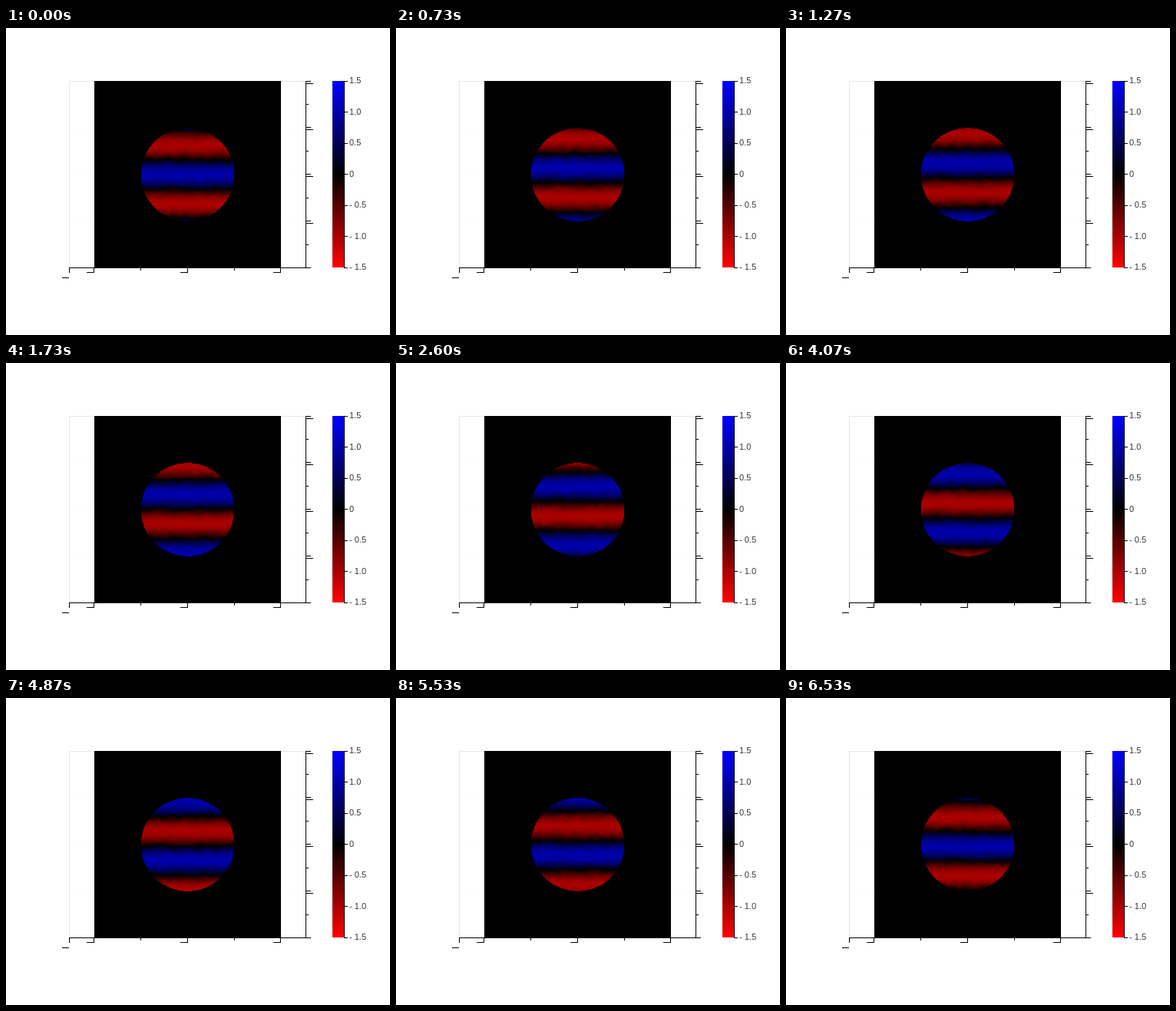
Animation, 500 px wide and 400 px high, one loop 6670 ms. Source, as an HTML page with a canvas:

```html
<!DOCTYPE html>
<html>
<head>
<meta charset="utf-8">
<style>
html, body { margin: 0; width: 100%; height: 100%; overflow: hidden; background: #fff; }
canvas { display: block; }
</style>
</head>
<body>
<canvas id="stage" width="500" height="400"></canvas>
<script>
const ctx = document.getElementById('stage').getContext('2d');
const LOOP = 6670, SLOTS = 100;
const LEFT = 176, TOP = 130, WIDTH = 121, HEIGHT = 122, RADIUS = 60.75;
const WAVE = 5 / RADIUS;      // radians per pixel
const PEAK = 170;             // amplitude 1 on a scale of 1.5
const held = new Set([1, 3, 12, 18, 27, 38, 40, 45, 54, 60, 69, 75, 78, 87, 99]);

function rect(x, y, w, h, color = '#000') {
  ctx.fillStyle = color;
  ctx.fillRect(x, y, w, h);
}

function drawPlot() {
  rect(0, 0, 500, 400, '#fff');
  for (const y of [130, 191, 252]) rect(82, y, 309, 1, '#fcfcfc');
  rect(82, 69, 309, 1, '#e6e6e6');
  rect(82, 69, 1, 244, '#e6e6e6');
  rect(115, 69, 243, 244);
  rect(82, 312, 309, 1);
  rect(390, 69, 1, 244);

  // bottom axis
  rect(82, 312, 1, 7);
  rect(73, 325, 9, 1);
  for (const x of [114, 236, 357]) {
    rect(x, 312, 1, 7);
    rect(x - 9, 318, 9, 1);
  }
  for (const x of [175, 297]) rect(x, 312, 1, 4);

  // right axis
  for (let i = 0; i < 9; i++) {
    const y = Math.floor(69 + i * 30.45), major = i % 2 === 0;
    rect(391, y, major ? 6 : 3, 1);
    if (major && i < 8) rect(391, y + 3, 9, 1);
  }

  // colour bar
  const ramp = ctx.createLinearGradient(0, 69, 0, 312);
  ramp.addColorStop(0, '#00f');
  ramp.addColorStop(0.5, '#000');
  ramp.addColorStop(1, '#f00');
  rect(425, 69, 16, 243, ramp);
  rect(440, 69, 1, 244);
  ctx.font = '11px "Liberation Sans", Arial, sans-serif';
  ['1.5', '1.0', '0.5', '0', '- 0.5', '- 1.0', '- 1.5'].forEach((label, i) => {
    const y = 69 + i * 40.5;
    rect(441, Math.floor(y), 4, 1);
    ctx.fillStyle = '#333';
    ctx.fillText(label, 447, Math.round(y + 3.2));
  });
}

// Uneven mesh: each pixel samples the wave at a slightly shifted height.
function hash(x, y) {
  const s = Math.sin(x * 127.1 + y * 311.7) * 43758.5453;
  return s - Math.floor(s);
}

function meshShift(x, y) {
  const u = x / 7, v = y / 6, i = Math.floor(u), j = Math.floor(v), a = u - i, b = v - j;
  const upper = hash(i, j) * (1 - a) + hash(i + 1, j) * a;
  const lower = hash(i, j + 1) * (1 - a) + hash(i + 1, j + 1) * a;
  return (upper * (1 - b) + lower * b - 0.5) * 3;
}

const disk = ctx.createImageData(WIDTH, HEIGHT);
const points = [];
for (let y = 0; y < HEIGHT; y++) {
  for (let x = 0; x < WIDTH; x++) {
    const dx = x + 0.5 - WIDTH / 2, dy = y + 0.5 - HEIGHT / 2, at = (y * WIDTH + x) * 4;
    disk.data[at + 3] = 255;
    if (Math.hypot(dx, dy) <= RADIUS) points.push({ at, phase: (dy + meshShift(x, y)) * WAVE });
  }
}

function drawDisk(slot) {
  const turn = slot / SLOTS * 2 * Math.PI;
  for (const { at, phase } of points) {
    const value = PEAK * Math.cos(phase + turn);
    disk.data[at] = Math.max(0, -value);
    disk.data[at + 2] = Math.max(0, value);
  }
  ctx.putImageData(disk, LEFT, TOP);
}

let shown = -1;
function frame() {
  let slot = Math.floor((performance.now() % LOOP + 4) / LOOP * SLOTS) % SLOTS;
  if (held.has(slot)) slot--;
  if (slot !== shown) drawDisk(shown = slot);
  requestAnimationFrame(frame);
}

drawPlot();
frame();
</script>
</body>
</html>
```
